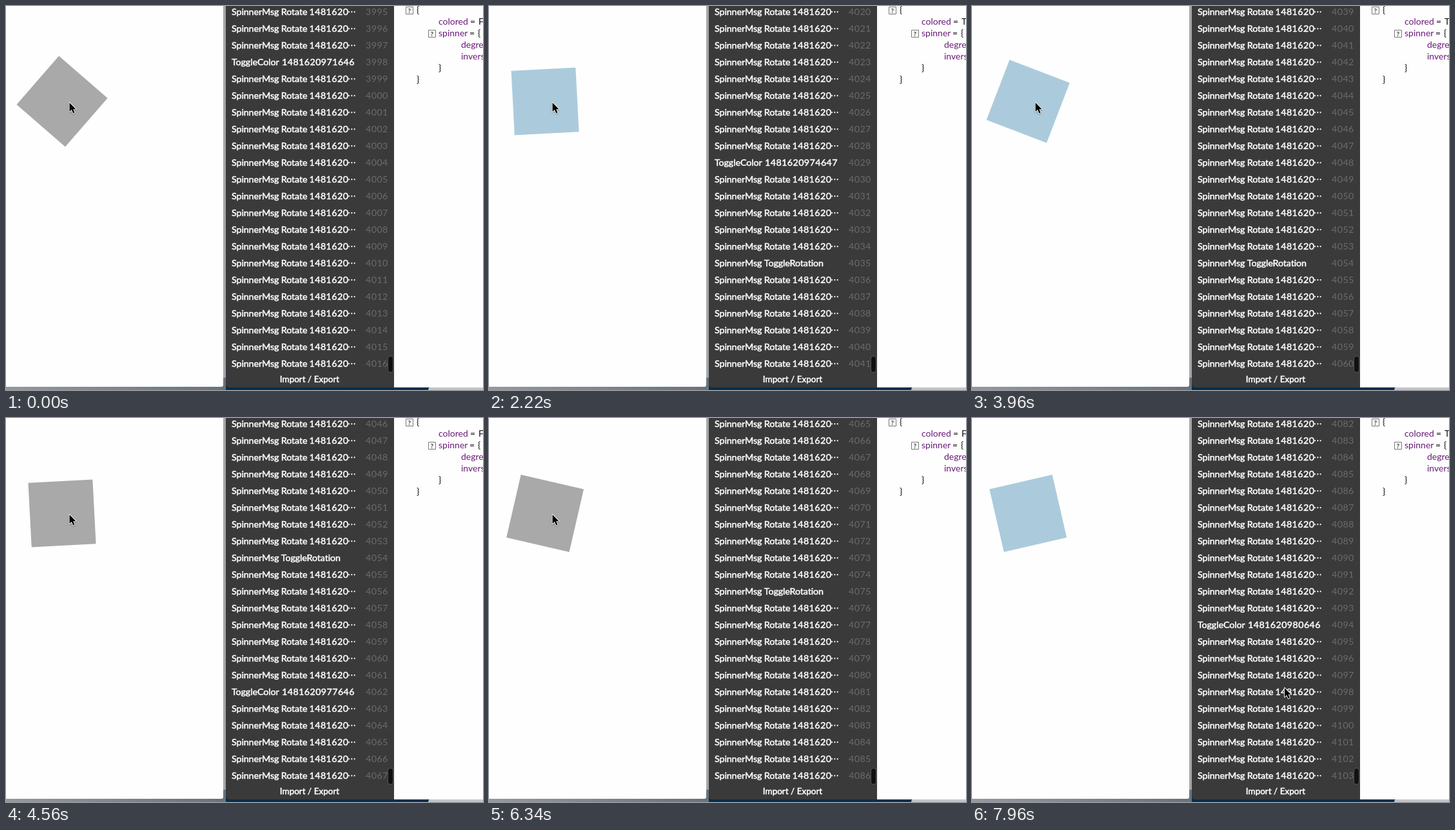
An HTML page with a canvas for the animation above (8000 ms loop, 740 by 596 pixels).

```html
<!DOCTYPE html>
<html lang="en">
<head>
<meta charset="utf-8">
<title>Message log</title>
<style>
  html, body { margin: 0; width: 100%; height: 100%; overflow: hidden; background: #fff; }
  canvas { display: block; }
</style>
</head>
<body>
<canvas id="stage" width="740" height="596"></canvas>
<script>
const ctx = document.getElementById('stage').getContext('2d');
const LOOP = 8000;
const SANS = 'Lato, sans-serif';

// Screen refreshes: first time, last time, count
const refreshes = [
  [150, 1180, 8], [1320, 2220, 7], [2370, 3380, 8], [3530, 3960, 4], [4110, 4560, 4],
  [4710, 5740, 8], [5890, 6930, 8], [7070, 7960, 7]
].flatMap(([first, last, count]) => Array.from({ length: count },
  (_, i) => Math.round((first + (last - first) * i / (count - 1)) / 10) * 10));

// Message numbers of the two kinds of toggle
const colorToggles = { 3998: '1481620971646', 4029: '1481620974647', 4062: '1481620977646', 4094: '1481620980646' };
const rotationToggles = [4035, 4054, 4075];
const FIRST = 4016;
const laterToggles = [...Object.keys(colorToggles).map(Number), ...rotationToggles]
  .filter(n => n > FIRST).sort((a, b) => a - b);

function stateAt(time) {
  let last = FIRST + Math.floor(0.97 + time * 0.01012);
  for (const toggle of laterToggles) if (toggle <= last) last++;
  let angle = 41, step = -4, colored = false;
  for (let n = FIRST + 1; n <= last; n++) {
    if (colorToggles[n]) colored = !colored;
    else if (rotationToggles.includes(n)) step = -step;
    else angle += step;
  }
  return { last, angle, colored };
}

function rect(x, y, w, h, fill, radii = 0) {
  ctx.fillStyle = fill;
  ctx.beginPath();
  ctx.roundRect(x, y, w, h, radii);
  ctx.fill();
}

function text(string, x, y, color, font, { spacing = 0, weight = 0 } = {}) {
  ctx.font = font;
  ctx.letterSpacing = spacing + 'px';
  ctx.fillStyle = ctx.strokeStyle = color;
  ctx.fillText(string, x, y);
  if (weight) {
    ctx.lineWidth = weight;
    ctx.strokeText(string, x, y);
  }
}

function drawDesktop() {
  const shade = ctx.createLinearGradient(0, 0, 341, 0);
  shade.addColorStop(0, '#94999f');
  shade.addColorStop(1, '#68727c');
  rect(0, 0, 740, 596, shade);
  rect(336, 0, 5, 577, '#a4a6a8');
  rect(341, 570, 320, 26, '#06304f');
  rect(655, 590, 85, 6, '#c2c5c8', [6, 0, 0, 0]);
  rect(0, 0, 337, 591, '#fefefe', [0, 0, 3, 0]);
  rect(602, 0, 138, 592, '#fefefe');
  rect(341, 0, 261, 592, '#3a3a3a', [0, 0, 0, 5]);
}

function drawSquare({ angle, colored }) {
  ctx.save();
  ctx.translate(87, 148);
  ctx.rotate(angle * Math.PI / 180);
  rect(-50, -50, 100, 100, colored ? '#abcbdc' : '#a9a9a9');
  ctx.restore();
}

function drawLog(last) {
  const font = '14.3px ' + SANS;
  const words = { spacing: -0.1, weight: 0.5 };
  const digits = { spacing: 0.4, weight: 0.5 };
  const white = (string, x, y, style) => text(string, x, y, '#fff', font, style);
  for (let row = 0; row < 22; row++) {
    const n = last - 21 + row, y = 14 + row * 26;
    if (colorToggles[n]) {
      white('ToggleColor', 350, y, words);
      white(colorToggles[n], 428, y, digits);
    } else if (rotationToggles.includes(n)) {
      white('SpinnerMsg ToggleRotation', 350, y, words);
    } else {
      white('SpinnerMsg Rotate', 350, y, words);
      white('1481620', 470.5, y, digits);
      text('···', 530, y, '#fff', '13.5px "DejaVu Sans", sans-serif', { weight: 0.3 });
    }
    text(n, 558, y, '#6c6c6c', font, { spacing: 0.4 });
  }
  rect(592, 543, 9, 26, '#555', 4.5);
  rect(593, 544, 7, 24, '#111', 3.5);
  ctx.textAlign = 'center';
  text('Import / Export', 471, 584, '#fff', '13.5px ' + SANS, { weight: 0.5 });
  ctx.textAlign = 'left';
}

function drawIcon(x, y) {
  ctx.strokeStyle = '#777';
  ctx.lineWidth = 1;
  ctx.strokeRect(x + 0.5, y + 0.5, 11, 11);
  text('?', x + 3.5, y + 10, '#333', 'bold 10px ' + SANS);
}

function drawModel(colored) {
  const font = '14px ' + SANS, key = '#6a1b78', black = '#111';
  drawIcon(620, 1);
  drawIcon(655, 37);
  text('{', 637, 11, black, font);
  text('colored', 671, 29, key, font);
  text('=', 720, 29, black, font);
  text(colored ? 'True' : 'False', 733, 29, black, font);
  text('spinner', 671, 47, key, font);
  text('=', 719, 47, black, font);
  text('{', 732, 47, black, font);
  text('degrees', 706, 65, key, font);
  text('inverse', 706, 83, key, font);
  text('}', 671, 101, black, font);
  text('}', 637, 119, black, font);
}

function drawCursor(time) {
  const p = Math.min(1, Math.max(0, (time - 7370) / 590));
  const ease = p * p * (3 - 2 * p);
  ctx.save();
  ctx.translate(98.5 + 386.5 * ease, 150 + 269 * ease);
  const arrow = new Path2D('M0 0V14L3.3 11L5.7 16.5L8 15.5L5.7 10.2H10Z');
  ctx.shadowColor = 'rgba(0,0,0,.35)';
  ctx.shadowBlur = 2;
  ctx.shadowOffsetY = 1;
  ctx.strokeStyle = '#fff';
  ctx.lineWidth = 1.8;
  ctx.stroke(arrow);
  ctx.shadowColor = 'transparent';
  ctx.fillStyle = '#000';
  ctx.fill(arrow);
  ctx.restore();
}

function draw(clock) {
  const time = refreshes.findLast(t => t <= clock) ?? 0;
  const state = stateAt(time);
  drawDesktop();
  drawSquare(state);
  drawLog(state.last);
  drawModel(state.colored);
  drawCursor(time);
}

ctx.lineJoin = 'round';
const start = performance.now();
function tick() {
  draw((performance.now() - start) % LOOP);
  requestAnimationFrame(tick);
}
tick();
</script>
</body>
</html>
```
